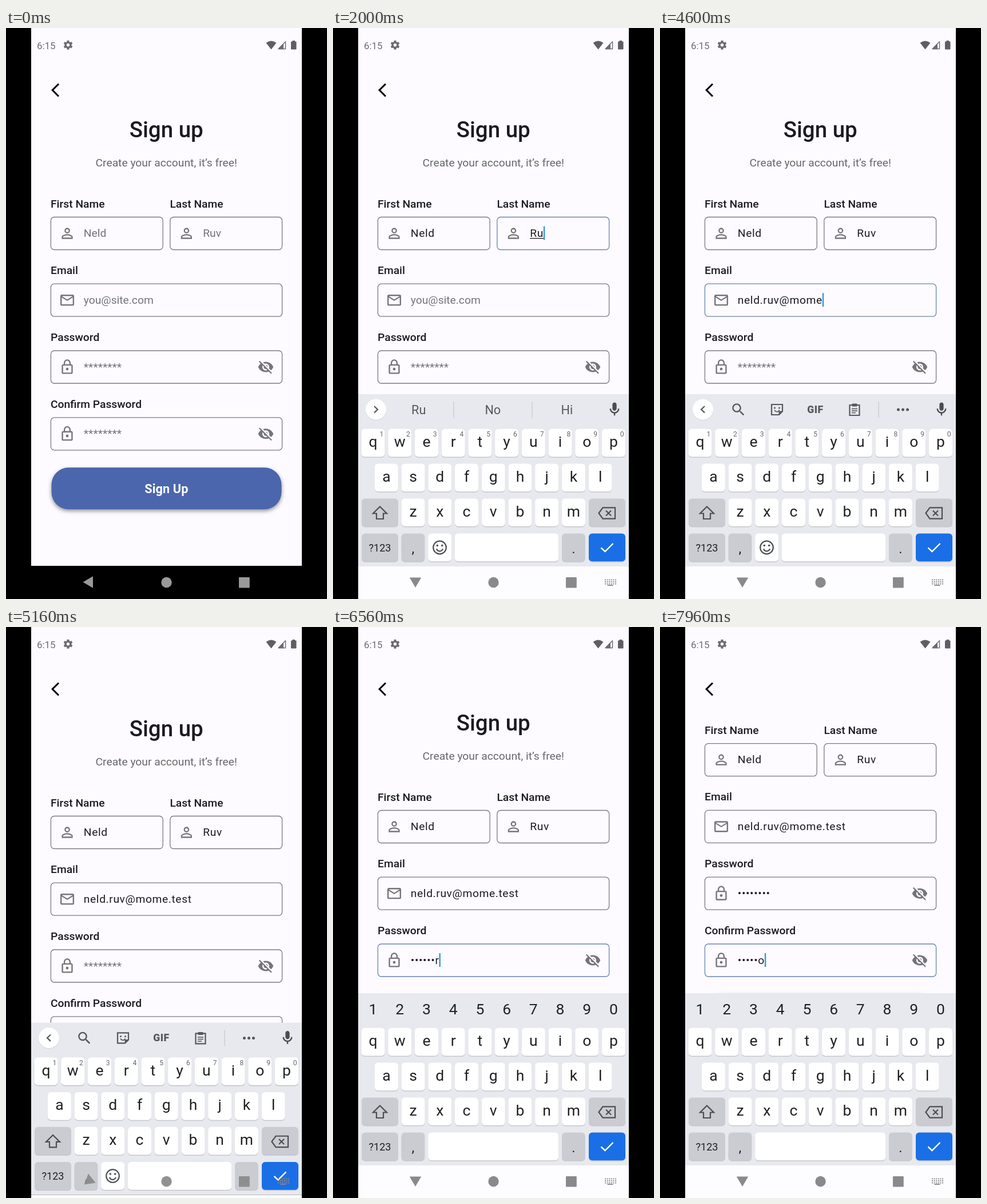
Write an HTML page with a canvas that moves like this. It is 561 px wide and 998 px high and loops after 8 s.

```html
<!DOCTYPE html>
<html lang="en">
<head>
<meta charset="utf-8">
<title>Sign up form</title>
<style>
html, body { margin: 0; width: 100%; height: 100%; overflow: hidden; background: #000; }
canvas { display: block; width: 561px; height: 998px; }
</style>
</head>
<body>
<canvas id="stage"></canvas>
<script>
const W = 561, H = 998, LOOP = 8000, DP = 1.204;
const LEFT = 44, RIGHT = 517, NAV_TOP = 940, KB_TOP = 640;
const PAPER = '#fdfbff', INK = '#1b1b1f', GREY = '#757578', KEY_INK = '#202124', TOOL = '#55585c';

const canvas = document.getElementById('stage');
const ctx = canvas.getContext('2d');
const ratio = window.devicePixelRatio || 1;
canvas.width = W * ratio;
canvas.height = H * ratio;

const icons = {
  person: 'M12 5.9a2.1 2.1 0 1 1 0 4.2a2.1 2.1 0 1 1 0-4.2m0 9c2.97 0 6.1 1.46 6.1 2.1v1.1H5.9V17c0-.64 3.13-2.1 6.1-2.1M12 4a4 4 0 1 0 0 8a4 4 0 1 0 0-8zm0 9c-2.67 0-8 1.34-8 4v3h16v-3c0-2.66-5.33-4-8-4z',
  mail: 'M22 6c0-1.1-.9-2-2-2H4c-1.1 0-2 .9-2 2v12c0 1.1.9 2 2 2h16c1.1 0 2-.9 2-2V6zm-2 0l-8 5-8-5h16zm0 12H4V8l8 5 8-5v10z',
  lock: 'M12 17a2 2 0 1 0 0-4a2 2 0 1 0 0 4zm6-9h-1V6c0-2.76-2.24-5-5-5S7 3.24 7 6v2H6c-1.1 0-2 .9-2 2v10c0 1.1.9 2 2 2h12c1.1 0 2-.9 2-2V10c0-1.1-.9-2-2-2zM8.9 6c0-1.71 1.39-3.1 3.1-3.1s3.1 1.39 3.1 3.1v2H8.9V6zM18 20H6V10h12v10z',
  eyeOff: 'M12 7c2.76 0 5 2.24 5 5 0 .65-.13 1.26-.36 1.83l2.92 2.92c1.51-1.26 2.7-2.89 3.43-4.75-1.73-4.39-6-7.5-11-7.5-1.4 0-2.74.25-3.98.7l2.16 2.16C10.74 7.13 11.35 7 12 7zM2 4.27l2.28 2.28.46.46C3.08 8.3 1.78 10.02 1 12c1.73 4.39 6 7.5 11 7.5 1.55 0 3.03-.3 4.38-.84l.42.42L19.73 22 21 20.73 3.27 3 2 4.27zM7.53 9.8l1.55 1.55c-.05.21-.08.43-.08.65 0 1.66 1.34 3 3 3 .22 0 .44-.03.65-.08l1.55 1.55c-.67.33-1.41.53-2.2.53-2.76 0-5-2.24-5-5 0-.79.2-1.53.53-2.2zm4.31-.78l3.15 3.15.02-.16c0-1.66-1.34-3-3-3l-.17.01z',
  back: 'M11.67 3.87L9.9 2.1 0 12l9.9 9.9 1.77-1.77L3.54 12z',
  mic: 'M12 14c1.66 0 3-1.34 3-3V5c0-1.66-1.34-3-3-3S9 3.34 9 5v6c0 1.66 1.34 3 3 3zm5-3c0 2.76-2.24 5-5 5s-5-2.24-5-5H5c0 3.53 2.61 6.43 6 6.92V21h2v-3.08c3.39-.49 6-3.39 6-6.92h-2z',
  search: 'M15.5 14h-.79l-.28-.27C15.41 12.59 16 11.11 16 9.5a6.5 6.5 0 1 0-6.5 6.5c1.61 0 3.09-.59 4.23-1.57l.27.28v.79l5 4.99L20.49 19l-4.99-5zm-6 0a4.5 4.5 0 1 1 0-9a4.5 4.5 0 1 1 0 9z'
};
for (const name in icons) icons[name] = new Path2D(icons[name]);

const clamp = v => Math.min(1, Math.max(0, v));
const ease = v => 1 - (1 - clamp(v)) ** 3;
const steps = (count, start, gap) => Array.from({ length: count }, (_, i) => start + gap * i);

const fields = [
  { label: 'First Name', x: 78.4, y: 330.5, w: 195.8, icon: 'person', hint: 'Neld', value: 'Neld',
    focus: [360, 1440], typed: steps(4, 740, 120), composing: true },
  { label: 'Last Name', x: 286.8, y: 330.5, w: 195.8, icon: 'person', hint: 'Ruv', value: 'Ruv',
    focus: [1440, 2480], typed: steps(3, 1820, 130), composing: true },
  { label: 'Email', x: 78.4, y: 447.2, w: 404.2, icon: 'mail', hint: 'you@site.com', value: 'neld.ruv@mome.test',
    focus: [2480, 5070], typed: [...steps(13, 3115, 121), ...steps(5, 4662, 95)] },
  { label: 'Password', x: 78.4, y: 564, w: 404.2, icon: 'lock', hint: '********', value: 'password',
    focus: [5680, 6800], typed: steps(8, 6040, 85), secret: true },
  { label: 'Confirm Password', x: 78.4, y: 680.8, w: 404.2, icon: 'lock', hint: '********', value: 'password',
    focus: [7200, 9000], typed: steps(8, 7560, 78), secret: true }
];

const keyboards = [
  { open: 420, close: 5070 },
  { open: 5738, close: 6800, secret: true },
  { open: 7327, close: 9000, secret: true }
];

function text(str, x, y, size, color, { weight = 400, align = 'left', spacing = 0 } = {}) {
  ctx.font = `${weight} ${size}px Roboto, sans-serif`;
  ctx.letterSpacing = spacing + 'px';
  ctx.textAlign = align;
  ctx.fillStyle = color;
  ctx.fillText(str, x, y);
  return ctx.measureText(str).width;
}

function icon(name, cx, cy, color, scale = DP) {
  ctx.save();
  ctx.translate(cx - 12 * scale, cy - 12 * scale);
  ctx.scale(scale, scale);
  ctx.fillStyle = color;
  ctx.fill(icons[name], 'evenodd');
  ctx.restore();
}

function box(x, y, w, h, r, color) {
  ctx.beginPath();
  ctx.roundRect(x, y, w, h, r);
  ctx.fillStyle = color;
  ctx.fill();
}

function disc(x, y, r, color) {
  ctx.beginPath();
  ctx.arc(x, y, r, 0, Math.PI * 2);
  ctx.fillStyle = color;
  ctx.fill();
}

function line(points, width, color, close) {
  ctx.beginPath();
  points.forEach(([x, y]) => ctx.lineTo(x, y));
  if (close) ctx.closePath();
  ctx.lineWidth = width;
  ctx.strokeStyle = color;
  ctx.stroke();
}

function shape(points, color) {
  ctx.beginPath();
  points.forEach(([x, y]) => ctx.lineTo(x, y));
  ctx.fillStyle = color;
  ctx.fill();
}

function statusBar() {
  const c = '#6c6c70';
  text('6:15', 54, 36.5, 16.9, c);
  ctx.beginPath();
  ctx.arc(108.5, 29.8, 4.4, 0, Math.PI * 2);
  ctx.lineWidth = 3.4;
  ctx.strokeStyle = c;
  ctx.stroke();
  for (let i = 0; i < 6; i++) {
    const a = i * Math.PI / 3 + Math.PI / 6, dx = Math.cos(a), dy = Math.sin(a);
    line([[108.5 + dx * 5, 29.8 + dy * 5], [108.5 + dx * 7.9, 29.8 + dy * 7.9]], 4, c);
  }
  ctx.beginPath();
  ctx.moveTo(463.5, 37.5);
  ctx.lineTo(454.5, 26);
  ctx.quadraticCurveTo(463.5, 18.8, 472.5, 26);
  ctx.fillStyle = '#5f5f63';
  ctx.fill();
  line([[476.5, 36.5], [488.5, 36.5], [488.5, 24]], 1.4, c);
  shape([[475, 37.2], [485, 27], [485, 37.2]], c);
  line([[476, 36.6], [488.8, 23.6]], 1.4, c);
  box(498, 23.5, 9.5, 14, 1.3, '#5f5f63');
  box(500.5, 22, 4.5, 2.5, 0, '#5f5f63');
}

function drawField(f, t) {
  const count = f.typed.filter(at => at <= t).length;
  const focused = t >= f.focus[0] && t < f.focus[1];
  const last = count ? f.typed[count - 1] : f.focus[0];
  const base = f.y + 34.5, tx = f.x + 57.4;

  text(f.label, f.x - .4, f.y - 17, 16 * DP, INK, { weight: 500 });
  ctx.beginPath();
  ctx.roundRect(f.x, f.y, f.w, 57, 6);
  ctx.lineWidth = 1.3;
  ctx.strokeStyle = focused ? '#6b84b0' : '#7b7b80';
  ctx.stroke();
  icon(f.icon, f.x + 28.6, f.y + 28.5, GREY);
  if (f.secret) icon('eyeOff', f.x + f.w - 28.6, f.y + 28.5, GREY);

  const hintAlpha = count ? .55 * (1 - clamp((t - f.typed[0]) / 120)) : 1;
  if (hintAlpha > 0) {
    ctx.globalAlpha = hintAlpha;
    text(f.hint, tx, base, 16 * DP, '#747478');
    ctx.globalAlpha = 1;
  }

  let shown = f.value.slice(0, count);
  if (f.secret && count) {
    const reveal = focused && t - last < 700;
    shown = '•'.repeat(count - (reveal ? 1 : 0)) + (reveal ? shown.slice(-1) : '');
  }
  const width = shown ? text(shown, tx, base, 16 * DP, INK, { spacing: .5 * DP }) : 0;
  if (!focused) return;
  if (f.composing && count) box(tx, base + 2, width, 1.3, 0, INK);
  if ((t - last) % 1000 < 500) box(tx + width, f.y + 16, 2.4, 24, 0, '#2f97ea');
}

function scrollAt(t) {
  if (t < 7200) return 10 * (ease((t - 6000) / 100) - ease((t - 6900) / 100));
  return 126.8 * ease((t - 7480) / 180);
}

function page(t) {
  box(LEFT, 0, RIGHT - LEFT, NAV_TOP, 0, PAPER);
  statusBar();
  icon('back', 79 + 12 * DP, 108.6, '#050505');
  ctx.save();
  ctx.beginPath();
  ctx.rect(LEFT, 141, RIGHT - LEFT, NAV_TOP - 141);
  ctx.clip();
  ctx.translate(0, -scrollAt(t));
  text('Sign up', 280.2, 191, 32 * DP, INK, { weight: 500, align: 'center' });
  text('Create your account, it’s free!', 280.2, 242, 16 * DP, '#67676b', { align: 'center' });
  fields.forEach(f => drawField(f, t));
  ctx.save();
  ctx.shadowColor = 'rgba(0,0,0,.42)';
  ctx.shadowBlur = 7 * ratio;
  ctx.shadowOffsetY = 3 * ratio;
  box(79.5, 768.3, 402, 73, 30, '#4b66ac');
  ctx.restore();
  text('Sign Up', 280.4, 812.7, 18 * DP, '#fff', { weight: 600, align: 'center', spacing: .12 });
  ctx.restore();
}

function key(x, y, w, label, color = '#fff', size = 26.5, drop = 0) {
  box(x, y + 1.2, w, 49, 6, '#c5c7cc');
  box(x, y, w, 48.6, 6, color);
  if (label) text(label, x + w / 2, y + 31.3 + drop, size, KEY_INK, { align: 'center' });
}

function toolbar(suggestions) {
  disc(75, 667.5, 18.3, '#d5d7dc');
  disc(75, 666.7, 18, '#fff');
  const dir = suggestions ? 1 : -1;
  line([[75 - 3 * dir, 661], [75 + 3 * dir, 666.7], [75 - 3 * dir, 672.4]], 2.2, TOOL);
  icon('mic', 492, 666.5, '#4a4c50');
  if (suggestions) {
    suggestions.forEach((word, i) => text(word, 149.7 + i * 129.6, 675, 18 * DP, TOOL, { align: 'center' }));
    [211, 348].forEach(x => box(x - .6, 653, 1.2, 29, 0, '#c6c8cc'));
    return;
  }
  icon('search', 137, 667, TOOL, 1.2);
  // sticker
  line([[195, 658], [214, 658], [214, 670], [208, 676], [195, 676]], 2.2, TOOL, true);
  shape([[214, 669.5], [207.5, 669.5], [207.5, 676.5]], TOOL);
  disc(200.5, 664, 1.5, TOOL);
  disc(208.5, 664, 1.5, TOOL);
  ctx.beginPath();
  ctx.arc(204.3, 666.5, 4.2, .3, Math.PI - .3);
  ctx.lineWidth = 1.8;
  ctx.stroke();
  text('GIF', 271.5, 672.6, 17.5, TOOL, { weight: 900, align: 'center', spacing: .6 });
  // clipboard
  line([[331.5, 659], [348.5, 659], [348.5, 677], [331.5, 677]], 2.2, TOOL, true);
  box(335.5, 656.5, 9, 5, 1, TOOL);
  [665.5, 669, 672.5].forEach((y, i) => box(335, y - .8, i < 2 ? 10 : 7, 1.6, 0, TOOL));
  box(381.5, 653, 1.2, 28, 0, '#c6c8cc');
  [416.5, 424.5, 432.5].forEach(x => disc(x, 667, 2.5, TOOL));
}

function keyIcons(secret) {
  const c = '#4c4e53';
  line([[82, 836.5], [94, 848.5], [88, 848.5], [88, 858], [76, 858], [76, 848.5], [70, 848.5]], 2.2, c, true);
  line([[464.5, 848], [471.5, 838.3], [493, 838.3], [493, 857.7], [471.5, 857.7]], 2.2, c, true);
  line([[477, 843.5], [486, 852.5]], 2.2, c);
  line([[486, 843.5], [477, 852.5]], 2.2, c);
  line([[468.5, 908.5], [475.5, 915], [489.5, 901]], 2.4, '#fff');
  if (secret) return;
  ctx.beginPath();
  ctx.arc(186.5, 908, 11.3, 0, Math.PI * 2);
  ctx.lineWidth = 2.2;
  ctx.strokeStyle = c;
  ctx.stroke();
  disc(182.3, 904.5, 1.8, c);
  disc(190.7, 904.5, 1.8, c);
  ctx.beginPath();
  ctx.arc(186.5, 908.8, 5.6, .25, Math.PI - .25);
  ctx.stroke();
}

function drawKeyboard(kb, t, offset) {
  const pitch = 46.72, grey = '#cbccd1';
  const column = i => 70 + i * pitch;
  ctx.save();
  ctx.translate(0, offset);
  box(LEFT, KB_TOP, RIGHT - LEFT, 301, 0, '#e7e9ee');
  box(LEFT, 941, RIGHT - LEFT, 57, 0, '#fdfcff');
  if (kb.secret) {
    if (t > 5840 && t < 5960) box(46, KB_TOP, 47, 53, 0, '#d8d9de');
    [...'1234567890'].forEach((d, i) => text(d, column(i), 677.3, 26.5, KEY_INK, { align: 'center' }));
  } else {
    const f = fields.find(f => f.composing && t >= f.focus[0] && t < f.focus[1]);
    const count = f ? f.typed.filter(at => at <= t).length : 0;
    toolbar(count ? [f.value.slice(0, count), 'No', 'Hi'] : null);
  }
  ['qwertyuiop', 'asdfghjkl', 'zxcvbnm'].forEach((row, r) => {
    [...row].forEach((ch, i) => {
      const x = column(i + [0, .5, 1.5][r]);
      key(x - 20.5, 700.8 + r * 60.8, 41, ch);
      if (r === 0 && !kb.secret) {
        text(String((i + 1) % 10), x + 14.8, 714.2, 12.2, '#66686d', { align: 'center' });
      }
    });
  });
  key(50, 822.4, 64, '', grey);
  key(447, 822.4, 64, '', grey);
  key(50, 883.6, 64, '?123', grey, 18);
  key(119.6, 883.6, 40.6, ',', grey, 24, 3);
  if (!kb.secret) key(166.2, 883.6, 41, '');
  const space = kb.secret ? 166.2 : 212.8;
  key(space, 883.6, 394.2 - space, '');
  key(400, 883.6, 40.6, '.', grey, 24, 3);
  key(447, 883.6, 64, '', '#1a6fe6');
  keyIcons(kb.secret);
  ctx.restore();
}

function navIcons(turn, shown) {
  const color = shown ? '#8a8a8c' : '#9a9a9a';
  ctx.globalAlpha = shown ? .55 + .45 * shown : 1;
  ctx.save();
  ctx.translate(144, 968.5);
  ctx.rotate(-turn * Math.PI / 2);
  shape([[-9.5, 0], [8, -10.2], [8, 10.2]], color);
  ctx.restore();
  disc(280.5, 969, 9.2, color);
  box(407, 960, 18.8, 18.5, 1, color);
  if (shown) {
    for (let r = 0; r < 3; r++) {
      for (let i = 0; i < 6; i++) box(475 + i * 3.6, 963.5 + r * 3.5, 2, 2, 0, color);
    }
    box(479.5, 973.2, 10, 1.8, 0, color);
  }
  ctx.globalAlpha = 1;
}

function draw(t) {
  ctx.setTransform(ratio, 0, 0, ratio, 0, 0);
  box(0, 0, W, H, 0, '#000');
  ctx.save();
  ctx.beginPath();
  ctx.rect(LEFT, 0, RIGHT - LEFT, H);
  ctx.clip();
  page(t);
  const kb = keyboards.find(k => t > k.open && t < k.close + 240);
  let turn = 0, shown = 0;
  if (kb) {
    const leave = clamp((t - kb.close) / 240);
    const hidden = leave > 0 ? leave ** 2 : (1 - clamp((t - kb.open) / 285)) ** 2;
    shown = 1 - hidden;
    turn = leave > 0 ? 1 - clamp(leave * 1.5) : clamp((t - kb.open - 70) / 150);
    drawKeyboard(kb, t, (H - KB_TOP) * hidden);
  }
  navIcons(turn, shown);
  ctx.restore();
}

const start = performance.now();
function tick() {
  draw((performance.now() - start) % LOOP);
  requestAnimationFrame(tick);
}
tick();
</script>
</body>
</html>
```
